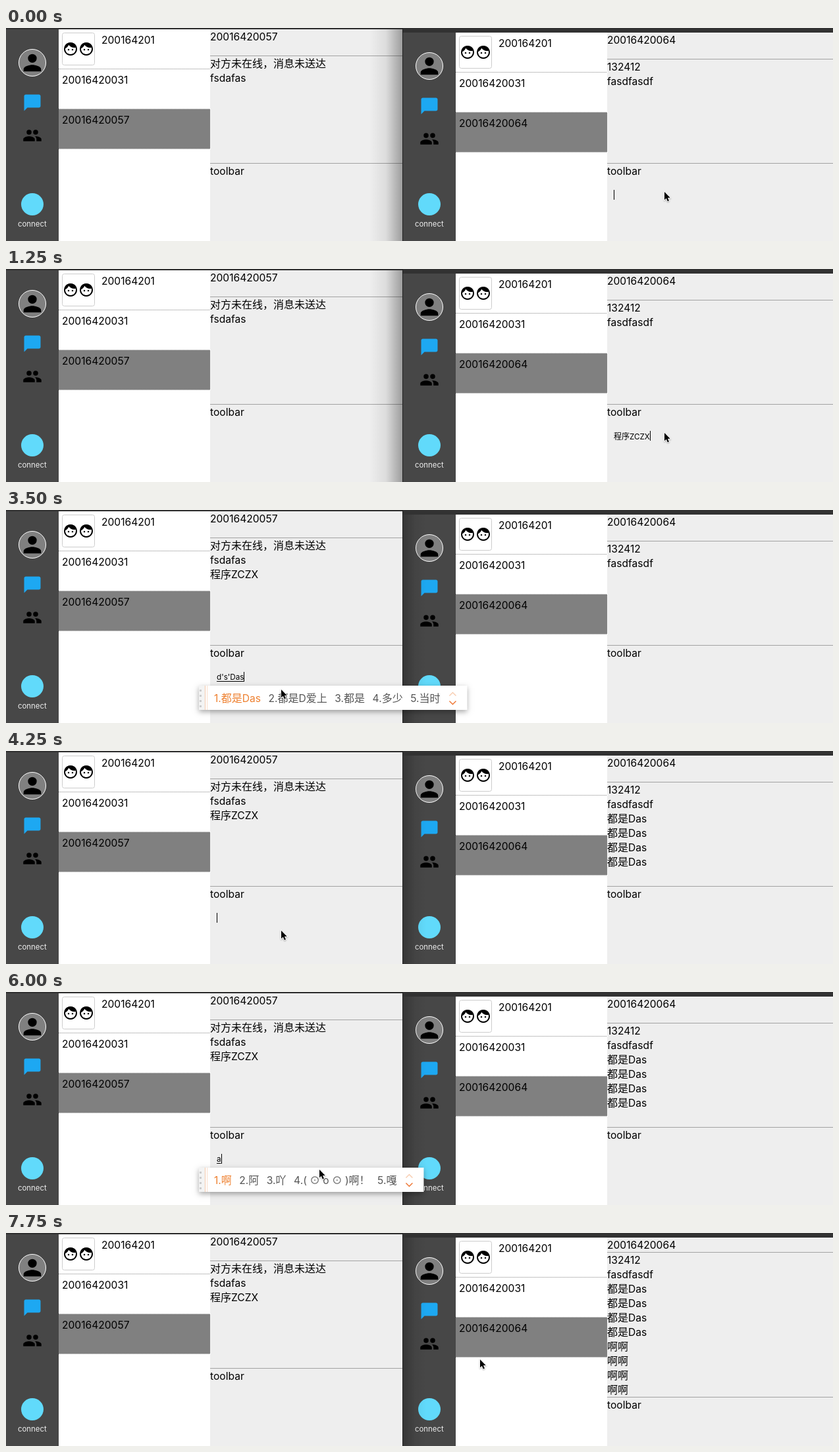
These frames come from a looping animation (1256x325 px, 8 s). An HTML page with a canvas:

```html
<!DOCTYPE html>
<html lang="zh-CN">
<head>
<meta charset="utf-8">
<title>Chat windows</title>
<style>
html, body { margin: 0; width: 100%; height: 100%; overflow: hidden; background: #fff; }
canvas { display: block; }
</style>
</head>
<body>
<canvas id="stage" width="1256" height="325"></canvas>
<script>
const ctx = document.getElementById('stage').getContext('2d');
const LOOP = 8000, STEP = 250;
const LATIN = 'Inter, sans-serif';
const HAN = '"Noto Sans CJK SC", "Noto Sans CJK", "Noto Sans CJK JP", sans-serif';

const icons = {
  person: new Path2D('M12 12a4 4 0 1 0 0-8a4 4 0 1 0 0 8zm0 2c-2.67 0-8 1.34-8 4v2h16v-2c0-2.66-5.33-4-8-4z'),
  bubble: new Path2D('M20 2H4c-1.1 0-2 .9-2 2v18l4-4h14c1.1 0 2-.9 2-2V4c0-1.1-.9-2-2-2z'),
  people: new Path2D('M16 11a3 3 0 1 0 0-6a3 3 0 1 0 0 6zm-8 0a3 3 0 1 0 0-6a3 3 0 1 0 0 6zm0 2c-2.33 0-7 1.17-7 3.5V19h14v-2.5c0-2.33-4.67-3.5-7-3.5zm8 0c-.29 0-.62.02-.97.05 1.16.84 1.97 1.97 1.97 3.45V19h6v-2.5c0-2.33-4.67-3.5-7-3.5z'),
  face: new Path2D('M12 2a10 10 0 1 0 .01 0zM12 20c-4.41 0-8-3.59-8-8 0-.29.02-.58.05-.86 2.36-1.05 4.23-2.98 5.21-5.37C11.07 8.33 14.05 10 17.42 10c.78 0 1.53-.09 2.25-.26.21.71.33 1.47.33 2.26 0 4.41-3.59 8-8 8zM9 11.75a1.25 1.25 0 1 0 .01 0zM15 11.75a1.25 1.25 0 1 0 .01 0z'),
  pointer: new Path2D('M0 0V14.5L3.3 11.4L5.7 17L8.2 16L5.8 10.5H10.3z')
};

const left = {
  x: 0, y: 0, top: 2, width: 602, bar: '#303030',
  rows: ['200164201', '20016420031', '20016420057']
};
const right = {
  x: 603, y: 5, top: 7, width: 653, bar: '#323232',
  rows: ['200164201', '20016420031', '20016420064']
};

// Input states: [start ms, text, kind, candidates]; each lasts until the next.
const leftInput = [
  [0, '', 'idle'],
  [2750, '', 'caret'],
  [3000, 'd', 'compose', ['的', '都', '到', '大', '等']],
  [3250, "d's", 'compose', ['都是', '多少', '当时', '但是', '大师']],
  [3500, "d's'Das", 'compose', ['都是Das', '都是D爱上', '都是', '多少', '当时']],
  [3750, '都是Das', 'caret'],
  [4000, '', 'caret'],
  [4500, '', 'idle'],
  [5000, '', 'caret'],
  [5500, '', 'idle'],
  [5750, 'a', 'compose', ['啊', '阿', '吖', '( ⊙ o ⊙ )啊！', '嘎']],
  [6250, '啊', 'caret'],
  [6500, '啊啊', 'caret'],
  [6750, '', 'caret'],
  [7250, '', 'idle']
];
const rightInput = [
  [0, '', 'caret'],
  [250, "c'x", 'compose', ['程序', '出现', '重新', '持续', '创新']],
  [500, "c'x'ZC", 'compose', ['程序ZC', '程序', '出现', '重新', '持续']],
  [750, "c'x'ZCZX", 'compose', ['程序ZCZX', '程序', '出现', '重新', '持续']],
  [1250, '程序ZCZX', 'caret'],
  [1500, '', 'caret'],
  [2000, '', 'idle']
];
const pointerPath = [
  [0, 1000, 250], [1500, 1000, 250], [2250, 442, 255], [2750, 442, 255],
  [3250, 418, 274], [4500, 418, 274], [5500, 476, 271], [6750, 476, 271],
  [7250, 601, 239], [7750, 720, 193]
];

function rect(x, y, w, h, color) {
  ctx.fillStyle = color;
  ctx.fillRect(x, y, w, h);
}

function disc(x, y, r, color) {
  ctx.fillStyle = color;
  ctx.beginPath();
  ctx.arc(x, y, r, 0, Math.PI * 2);
  ctx.fill();
}

function icon(path, x, y, scale, color) {
  ctx.save();
  ctx.translate(x, y);
  ctx.scale(scale, scale);
  ctx.fillStyle = color;
  ctx.fill(path, 'evenodd');
  ctx.restore();
}

// Draws mixed Latin and Chinese text and returns where it ends.
function text(str, x, y, size = 16, color = '#000') {
  ctx.fillStyle = color;
  for (const run of str.match(/[\u2e80-\uffff]+|[^\u2e80-\uffff]+/g) || []) {
    ctx.font = run[0] >= '\u2e80' ? `${size}px ${HAN}` : `${size * 0.975}px ${LATIN}`;
    ctx.fillText(run, x, y);
    x += ctx.measureText(run).width;
  }
  return x;
}

function dots(x, y, w) {
  for (let i = 0; i < w; i += 2) rect(x + i, y, 1, 1, '#888');
}

function fade(x, w, from, to, y) {
  const g = ctx.createLinearGradient(x, 0, x + w, 0);
  g.addColorStop(0, `rgba(0,0,0,${from})`);
  g.addColorStop(0.5, `rgba(0,0,0,${(from + to) * 0.22})`);
  g.addColorStop(1, `rgba(0,0,0,${to})`);
  rect(x, y, w, 325 - y, g);
}

function drawSidebar(x, y) {
  disc(x + 40, y + 53, 20.5, '#808080');
  ctx.strokeStyle = '#fff';
  ctx.lineWidth = 1;
  ctx.stroke();
  icon(icons.person, x + 20, y + 33, 40 / 24, '#000');
  icon(icons.bubble, x + 25, y + 99, 30 / 24, '#1da8f2');
  icon(icons.people, x + 25, y + 149, 30 / 24, '#000');
  disc(x + 40, 269, 17, '#61dafb');
  text('connect', x + 18, 303, 11.7, '#eee');
}

function drawWindow({ x, y, top, width, bar, rows }, messages, grown) {
  const chatX = x + 310;
  rect(x, 0, width, top, bar);
  rect(x, top, 80, 325 - top, '#474747');
  rect(x + 80, top, 230, 325 - top, '#fff');
  rect(chatX, top, width - 310, 325 - top, '#eee');
  drawSidebar(x, y);

  ctx.strokeStyle = '#ccc';
  ctx.lineWidth = 1;
  ctx.beginPath();
  ctx.roundRect(x + 85.5, y + 7.5, 49, 49, 3);
  ctx.stroke();
  icon(icons.face, x + 86, y + 20, 1, '#000');
  icon(icons.face, x + 110, y + 20, 1, '#000');
  rect(x + 80, y + 124, 230, 60, '#808080');
  dots(x + 80, y + 62, 230);
  dots(x + 80, y + 123, 230);
  dots(x + 80, y + 184, 230);
  rows.forEach((row, i) => text(row, x + (i ? 85 : 145), y + 24 + i * 61));

  text(rows[2], chatX, y + 19);
  const headerLine = y + (grown ? 24 : 42);
  const toolLine = grown ? 250 : 206;
  rect(chatX, headerLine, width - 310, 1, '#a2a2a2');
  rect(chatX, toolLine, width - 310, 1, '#a2a2a2');
  messages.forEach((m, i) => text(m, chatX, headerLine + 18 + i * 22));
  text('toolbar', chatX, toolLine + 18);
}

function chevron(x, y, dir, color) {
  ctx.strokeStyle = color;
  ctx.lineWidth = 1.4;
  ctx.beginPath();
  ctx.moveTo(x - 5, y - 2.5 * dir);
  ctx.lineTo(x, y + 2.5 * dir);
  ctx.lineTo(x + 5, y - 2.5 * dir);
  ctx.stroke();
}

function drawCandidates(x, words) {
  const labels = words.map((w, i) => `${i + 1}.${w}`);
  const layout = draw => labels.reduce((pos, label, i) =>
    text(label, pos, 293, 16, draw ? (i ? '#555' : '#ee8030') : 'transparent') + 11.5, x - 4) - 11.5;
  const end = layout(false);
  ctx.save();
  ctx.shadowColor = 'rgba(0,0,0,.35)';
  ctx.shadowBlur = 8;
  ctx.shadowOffsetY = 3;
  rect(x - 27, 268, end + 41 - x + 27, 37, '#fff');
  ctx.restore();
  rect(x - 27, 268, 9, 37, '#f3f3f3');
  for (let i = 0; i < 4; i++) rect(x - 26, 274 + i * 8, 3, 3, '#ccc');
  rect(x - 18, 268, 1, 37, '#f5c9ac');
  rect(x - 15, 268, 1, 37, '#f8ddcc');
  layout(true);
  chevron(end + 19, 281, -1, '#f8cdb0');
  chevron(end + 19, 294, 1, '#ee7430');
}

function drawInput(states, t, x) {
  const [, str, kind, words] = states.filter(s => s[0] <= t).pop();
  const end = text(str, x, kind === 'compose' ? 259 : 260, 12);
  if (kind !== 'idle') rect(Math.round(end), 247, 1, 15, '#000');
  if (kind !== 'compose') return;
  rect(x, 261, end - x, 1, '#000');
  drawCandidates(x, words);
}

function drawPointer(t) {
  const i = pointerPath.findLastIndex(p => p[0] <= t);
  const a = pointerPath[i], b = pointerPath[i + 1] || a;
  const k = b === a ? 0 : (t - a[0]) / (b[0] - a[0]);
  ctx.save();
  ctx.translate(a[1] + (b[1] - a[1]) * k, a[2] + (b[2] - a[2]) * k);
  ctx.scale(0.85, 0.85);
  ctx.lineWidth = 2;
  ctx.strokeStyle = '#fff';
  ctx.shadowColor = 'rgba(0,0,0,.3)';
  ctx.shadowBlur = 2;
  ctx.shadowOffsetY = 1;
  ctx.stroke(icons.pointer);
  ctx.shadowColor = 'transparent';
  ctx.fillStyle = '#000';
  ctx.fill(icons.pointer);
  ctx.restore();
}

function draw(now) {
  const t = Math.floor((now % LOOP) / STEP) * STEP;
  const leftActive = t >= 2750;
  const grown = t >= 6750;
  const leftMessages = ['对方未在线，消息未送达', 'fsdafas'];
  const rightMessages = ['132412', 'fasdfasdf'];
  if (t >= 1500) leftMessages.push('程序ZCZX');
  if (t >= 4000) rightMessages.push(...Array(4).fill('都是Das'));
  if (grown) rightMessages.push(...Array(4).fill('啊啊'));

  drawWindow(left, leftMessages, false);
  drawWindow(right, rightMessages, grown);
  if (leftActive) fade(603, 36, 0.25, 0, 7);
  else fade(552, 50, 0, 0.34, 2);
  rect(602, 0, 1, 325, '#222');

  drawInput(leftInput, t, 320);
  drawInput(rightInput, t, 923);
  drawPointer(t);
}

const start = performance.now();
function frame() {
  draw(performance.now() - start);
  requestAnimationFrame(frame);
}
frame();
</script>
</body>
</html>
```
